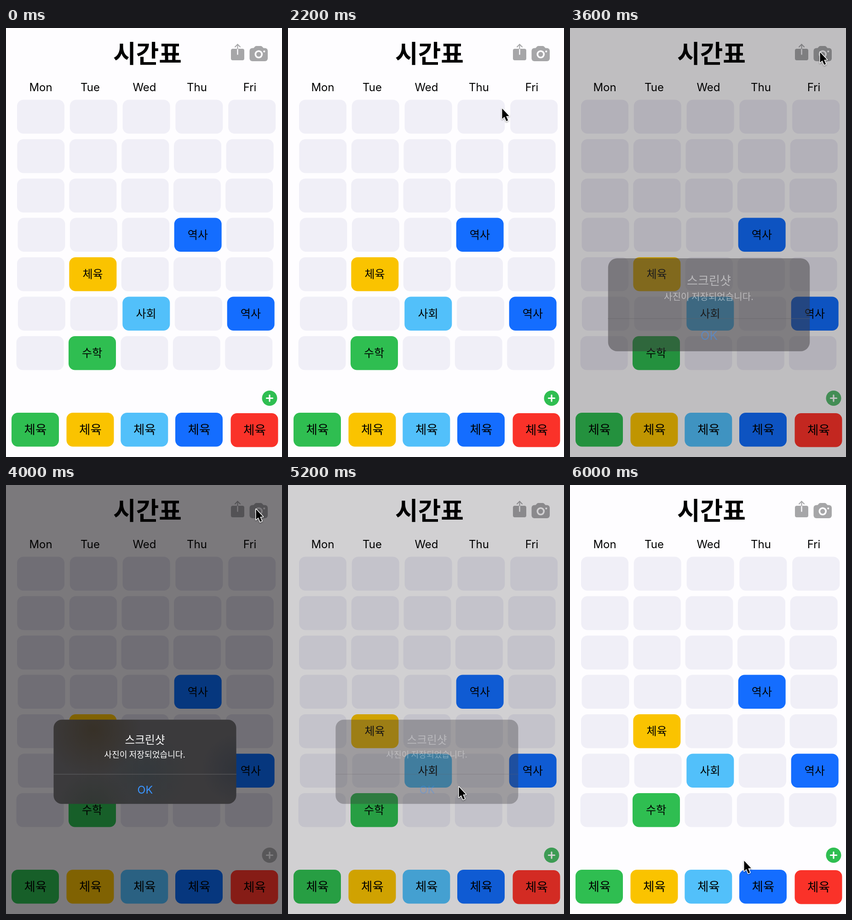
Write an HTML page with a canvas that moves like this. It is 600x930 px and loops after 6100 ms.

```html
<!DOCTYPE html>
<html lang="ko">
<head>
<meta charset="utf-8">
<title>시간표</title>
<style>
  html, body { margin: 0; width: 100%; height: 100%; overflow: hidden; background: #fefdff; }
  canvas { display: block; width: 600px; height: 930px; }
</style>
</head>
<body>
<canvas id="stage" width="600" height="930"></canvas>
<script>
const ctx = document.getElementById('stage').getContext('2d');
const LOOP = 6100, STEP = 100;
const HANGUL = '"Noto Sans CJK KR", "Noto Sans CJK", "Noto Sans CJK JP", sans-serif';
const LATIN = 'Inter, sans-serif';

// Each colour in its normal and its dimmed state
const palette = {
  page: [[254, 253, 255], [123, 121, 124]],
  cell: [[240, 239, 247], [112, 110, 117]],
  icon: [[166, 166, 168], [83, 82, 85]],
  green: [[47, 190, 81], [23, 95, 41]],
  yellow: [[250, 195, 0], [128, 98, 2]],
  sky: [[82, 192, 250], [42, 97, 130]],
  blue: [[20, 109, 255], [6, 55, 126]],
  red: [[250, 50, 41], [134, 28, 22]],
  plus: [[47, 190, 81], [88, 87, 89]],
  cross: [[255, 255, 255], [126, 125, 127]]
};

// y, first x, column pitch
const rows = [
  [155.5, 24, 114.8], [241, 24.3, 113.6], [326.5, 24, 113.3], [411.5, 25.5, 113.4],
  [497, 24, 113.4], [582.5, 25.9, 113.7], [668, 22.6, 113.4]
];
const lessons = {
  '3,3': ['blue', '역사'], '4,1': ['yellow', '체육'], '5,2': ['sky', '사회'],
  '5,4': ['blue', '역사'], '6,1': ['green', '수학']
};
const days = [['Mon', 75.5], ['Tue', 183], ['Wed', 301], ['Thu', 415], ['Fri', 530]];
const tray = [['green', 12], ['yellow', 131.5], ['sky', 249.3], ['blue', 368], ['red', 488.5]];

// time, tip x, tip y
const cursorPath = [
  [1600, 400, 940], [1900, 425, 480], [2200, 465.5, 174.5], [2700, 543.5, 52.5],
  [4200, 543.5, 52.5], [4800, 371.5, 654.5], [5400, 371.5, 654.5],
  [6000, 378.5, 814.5], [6100, 380, 940]
];

let dim = 0;
const clamp = v => Math.max(0, Math.min(1, v));
const easeOut = u => 1 - (1 - clamp(u)) ** 2;
const smooth = u => u * u * (3 - 2 * u);
const tone = name => {
  const [from, to] = palette[name];
  return `rgb(${from.map((v, i) => Math.round(v + (to[i] - v) * dim)).join(',')})`;
};

function box(x, y, w, h, r, fill) {
  ctx.fillStyle = fill;
  ctx.beginPath();
  ctx.roundRect(x, y, w, h, r);
  ctx.fill();
}

function disc(x, y, r, fill) {
  ctx.fillStyle = fill;
  ctx.beginPath();
  ctx.arc(x, y, r, 0, Math.PI * 2);
  ctx.fill();
}

function line(points, width, color) {
  ctx.strokeStyle = color;
  ctx.lineWidth = width;
  ctx.beginPath();
  points.forEach(([x, y]) => ctx.lineTo(x, y));
  ctx.stroke();
}

function label(text, x, y, size, family = HANGUL, fill = '#000', weight = 400) {
  ctx.font = `${weight} ${size}px ${family}`;
  ctx.fillStyle = fill;
  ctx.fillText(text, x, y);
}

function drawIcons() {
  const icon = tone('icon'), page = tone('page');
  box(489, 45, 29, 25, 4, icon);
  line([[503.5, 45], [503.5, 57]], 2.4, page);
  line([[503.5, 45], [503.5, 35.5]], 2, icon);
  line([[498, 41], [503.5, 35.5], [509, 41]], 2, icon);

  box(529.5, 43.5, 39.5, 28.5, 6, icon);
  ctx.beginPath();
  ctx.moveTo(537, 45);
  ctx.lineTo(541, 40.5);
  ctx.quadraticCurveTo(542, 39, 544, 39);
  ctx.lineTo(554, 39);
  ctx.quadraticCurveTo(556, 39, 557, 40.5);
  ctx.lineTo(561, 45);
  ctx.fill();
  disc(549.3, 57, 8.8, page);
  disc(549.3, 57, 5.2, icon);
  disc(561.3, 50.8, 2.1, page);

  disc(573, 802.5, 16.5, tone('plus'));
  const cross = tone('cross');
  line([[566.5, 802.5], [579.5, 802.5]], 3.2, cross);
  line([[573, 796], [573, 809]], 3.2, cross);
}

function drawTimetable() {
  ctx.fillStyle = tone('page');
  ctx.fillRect(0, 0, 600, 930);
  label('시간표', 307.5, 75.5, 54, HANGUL, '#000', 700);
  days.forEach(([day, x]) => label(day, x, 137, 24, LATIN));
  rows.forEach(([y, x0, pitch], r) => {
    for (let c = 0; c < 5; c++) {
      const x = x0 + pitch * c;
      const [color, name] = lessons[[r, c]] || ['cell', ''];
      box(x, y, 103, 73.5, 14, tone(color));
      label(name, x + 51.2, y + 45, 24);
    }
  });
  tray.forEach(([color, x], i) => {
    const y = i === 4 ? 835 : 834;
    box(x, y, 103, 73.5, 14, tone(color));
    label('체육', x + 52, y + 45.5, 26.5);
  });
  drawIcons();
}

function glow(x, y, r, rgb) {
  const g = ctx.createRadialGradient(x, y, 0, x, y, r);
  g.addColorStop(0, `rgba(${rgb},0.8)`);
  g.addColorStop(1, `rgba(${rgb},0)`);
  return g;
}

function drawAlert(alpha, scale) {
  if (alpha <= 0) return;
  ctx.save();
  ctx.globalAlpha = alpha;
  ctx.translate(302, 600);
  ctx.scale(scale, scale);
  ctx.translate(-302, -600);
  const panel = fill => box(103.5, 508.7, 397, 182.6, 18, fill);
  panel('#3b3a3c');
  if (alpha === 1) {
    panel(glow(190, 530, 105, '54,46,34'));
    panel(glow(305, 625, 90, '50,57,61'));
    panel(glow(190, 700, 80, '46,54,48'));
    panel(glow(500, 615, 75, '45,49,57'));
  }
  line([[103.5, 627], [500.5, 627]], 1.2, '#636265');
  label('스크린샷', 302, 561, 23.6, HANGUL, '#fff', 500);
  label('사진이 저장되었습니다.', 301.5, 591, 18.2, HANGUL, '#fff');
  label('OK', 302.3, 668.5, 23.5, LATIN, '#3a94ff');
  ctx.restore();
}

function drawCursor(t) {
  const next = cursorPath.findIndex(p => p[0] > t);
  if (next < 1) return;
  const [t0, x0, y0] = cursorPath[next - 1], [t1, x1, y1] = cursorPath[next];
  const raw = (t - t0) / (t1 - t0);
  const u = t0 < 2200 ? raw : smooth(raw);
  ctx.save();
  ctx.translate(x0 + (x1 - x0) * u, y0 + (y1 - y0) * u);
  ctx.beginPath();
  [[0, 0], [0, 22.5], [5, 18], [9, 27.3], [12.8, 25.7], [8.8, 16.6], [15.2, 16.2]]
    .forEach(([x, y]) => ctx.lineTo(x, y));
  ctx.closePath();
  ctx.shadowColor = 'rgba(0,0,0,0.35)';
  ctx.shadowBlur = 3;
  ctx.shadowOffsetY = 1.5;
  ctx.strokeStyle = '#fff';
  ctx.lineWidth = 3;
  ctx.stroke();
  ctx.shadowColor = 'transparent';
  ctx.fillStyle = '#000';
  ctx.fill();
  ctx.restore();
}

function render(now) {
  const t = Math.floor((now % LOOP) / STEP) * STEP;
  const shown = easeOut((t - 3500) / 360);
  dim = shown * (1 - easeOut((t - 5050) / 360));
  ctx.textAlign = 'center';
  ctx.lineCap = ctx.lineJoin = 'round';
  drawTimetable();
  drawAlert(dim, 1.2 - 0.2 * shown);
  drawCursor(t);
}

const start = performance.now();
function tick() {
  render(performance.now() - start);
  requestAnimationFrame(tick);
}
tick();
</script>
</body>
</html>
```
